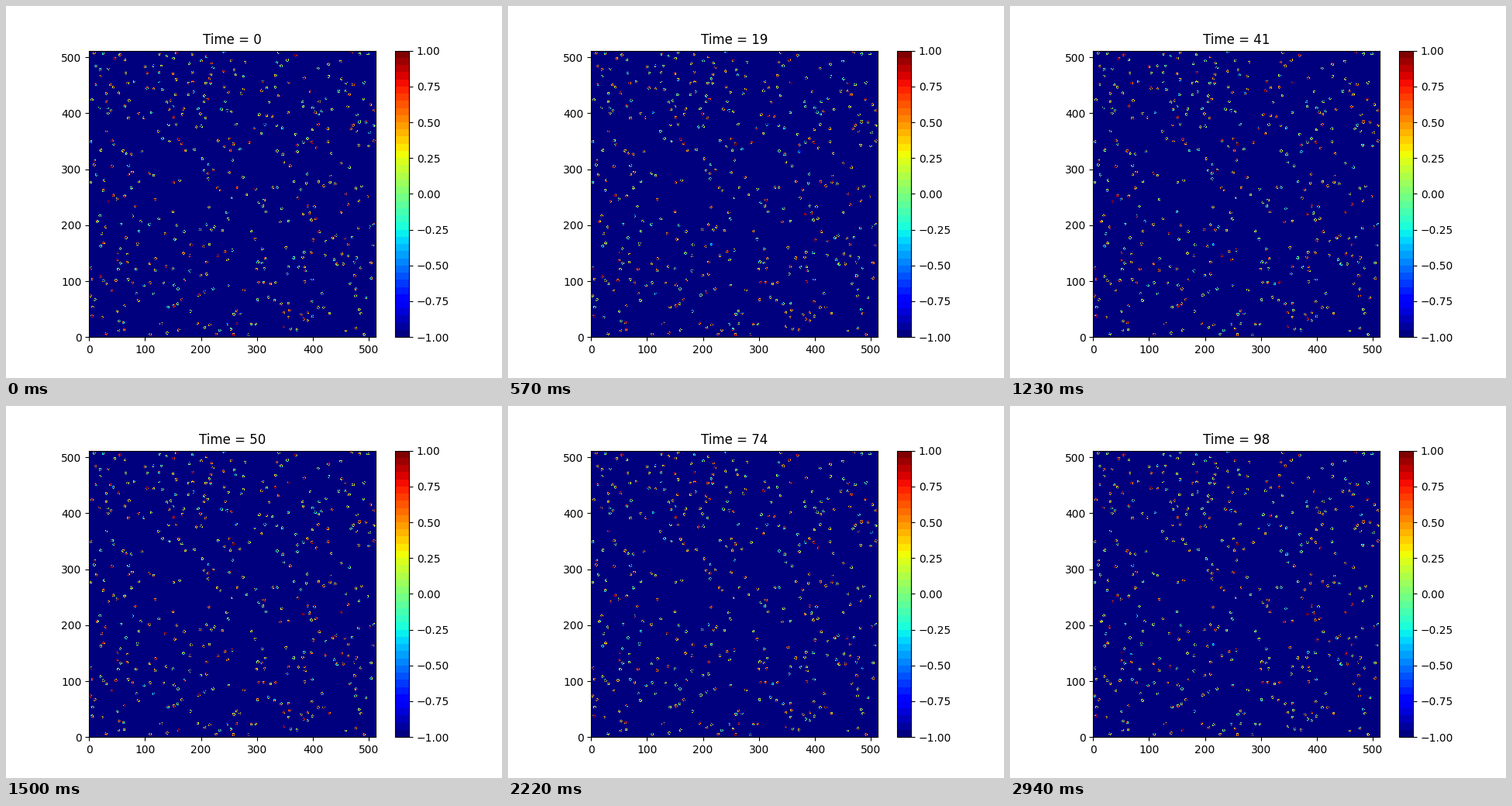
Animation of 640x480 px, one loop 2970 ms. Source, as a matplotlib script:

```python
import numpy as np
import matplotlib.pyplot as plt
from matplotlib.animation import FuncAnimation

FRAMES = 99
GRID = 512          # data units along each axis
SIZE, PAD = 371, 3  # field cells, one per screen pixel, and margin
COUNT, GAP = 455, 5.0

rng = np.random.default_rng(12)


def scatter():
    """Random spot centres that keep a small distance from each other."""
    pts = [rng.uniform(1, SIZE - 2, 2)]
    while len(pts) < COUNT:
        p = rng.uniform(1, SIZE - 2, 2)
        if np.hypot(*(np.array(pts) - p).T).min() > GAP:
            pts.append(p)
    return np.array(pts)


# Every spot is a small ring in a patch of 5 x 5 cells
spots = scatter()
cells = np.rint(spots).astype(int)
dx0, dy0 = (spots - cells).T[:, :, None, None]
dy, dx = np.mgrid[-2:3, -2:3]
cols = cells[:, 0, None, None] + dx + PAD
rows = cells[:, 1, None, None] + dy + PAD
dist = np.hypot(dx - dx0, dy - dy0)

per_spot = (COUNT, 1, 1)
radius = rng.uniform(1.1, 1.5, per_spot)
ring = (np.abs(dist - radius) < .5) & (rng.random(dist.shape) < .85)
tone = rng.normal(.3, .15, per_spot)
grain = rng.normal(0, .3, dist.shape)
cycles = rng.integers(12, 45, per_spot)
phase = rng.uniform(0, 2 * np.pi, per_spot)
grain_phase = rng.uniform(0, 2 * np.pi, dist.shape)


def field(i):
    angle = 2 * np.pi * cycles * i / FRAMES
    value = (tone + .3 * np.sin(angle + phase)
             + grain + .2 * np.sin(angle + grain_phase))
    z = np.full((SIZE + 2 * PAD,) * 2, -1.0)
    np.maximum.at(z, (rows, cols), np.where(ring, value, -1))
    return z[PAD:-PAD, PAD:-PAD].clip(-1, 1)


fig, ax = plt.subplots(figsize=(6.4, 4.8), dpi=100)

# Align the cells with whole screen pixels; the axes start at (107.2, 52.8)
unit = GRID / 369.6
left, bottom = -.2 * unit, -.8 * unit
extent = [left, left + SIZE * unit, bottom, bottom + SIZE * unit]
image = ax.imshow(field(0), cmap=plt.get_cmap("jet", 40), vmin=-1, vmax=1,
                  extent=extent, origin="lower", interpolation="nearest")
ax.set(xlim=(0, GRID), ylim=(0, GRID))
fig.colorbar(image, ax=ax)
title = ax.set_title("Time = 0")


def update(i):
    image.set_data(field(i))
    title.set_text(f"Time = {i}")
    return image, title


anim = FuncAnimation(fig, update, frames=FRAMES, interval=30, repeat=True,
                     repeat_delay=0, blit=False)
plt.show()
```
